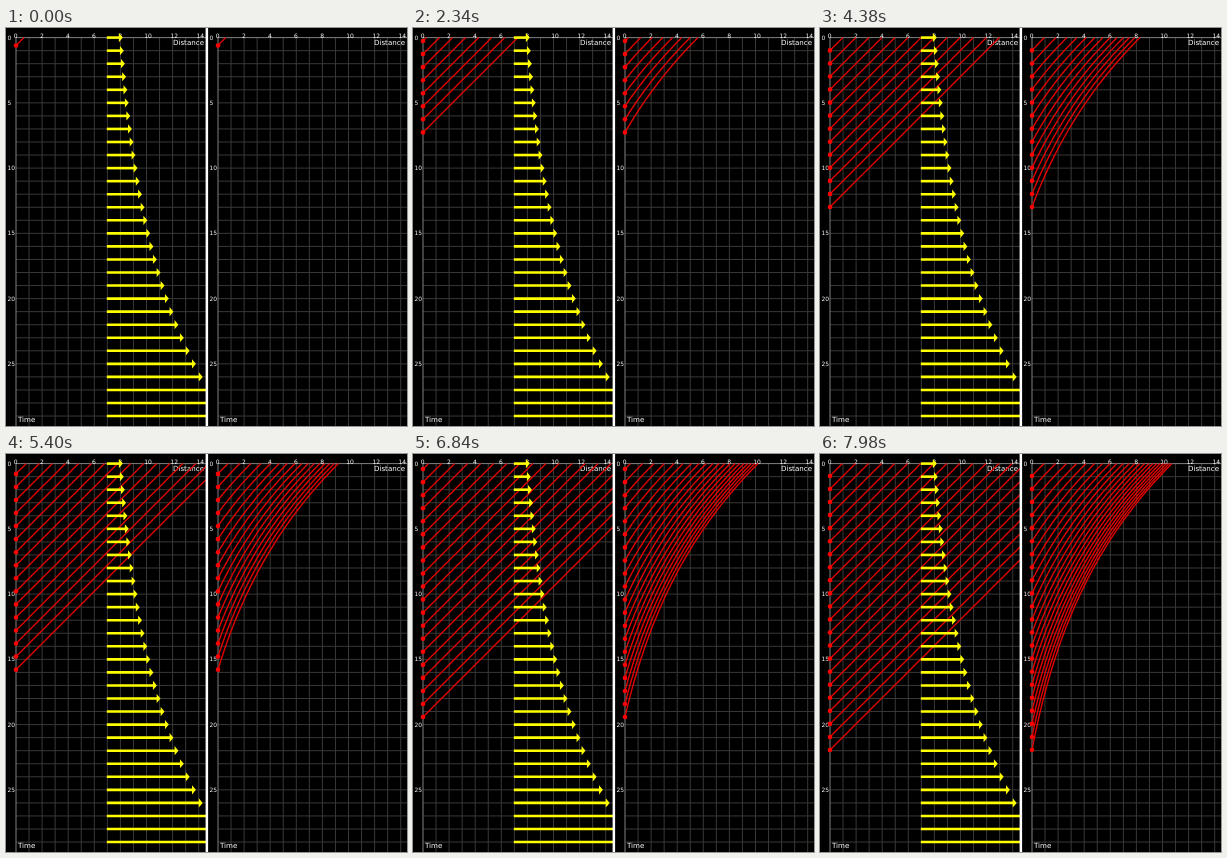
Write an HTML page with a canvas that moves like this. It is 401 px wide and 398 px high and loops after 8 s.

```html
<!DOCTYPE html>
<html lang="en">
<head>
<meta charset="utf-8">
<title>Light paths in static and expanding space</title>
<style>
html, body { margin: 0; width: 100%; height: 100%; overflow: hidden; background: #000; }
canvas { display: block; }
</style>
</head>
<body>
<canvas id="stage" width="401" height="398"></canvas>
<script>
const ctx = document.getElementById('stage').getContext('2d');
const W = 401, H = 398;
const UNIT = 13.05, TOP = 9.6, EXPANSION = 0.0755;
const LOOP = 8000, STEP = 60;
const LEFT = { x: 10, from: 0, to: 200 };
const RIGHT = { x: 212, from: 202, to: W };

// Vertical position of the earliest dot at a few steps.
const descent = [[0, 17.5], [24, 71.6], [53, 135], [84, 203.2], [98, 232.2], [112, 259.5], [126, 284.2], [133, 296]];

const rowY = t => TOP + t * UNIT;
const scaleAt = t => Math.exp(EXPANSION * t);
const straightPath = (t, end) => end - t;
const curvedPath = (t, end) => (1 / scaleAt(t) - 1 / scaleAt(end)) / EXPANSION;

function ageAt(step) {
  let i = 1;
  while (i < descent.length - 1 && step > descent[i][0]) i++;
  const [s0, y0] = descent[i - 1], [s1, y1] = descent[i];
  return (y0 + (y1 - y0) * (step - s0) / (s1 - s0) - TOP) / UNIT;
}

function line(x1, y1, x2, y2, color, width) {
  ctx.strokeStyle = color;
  ctx.lineWidth = width;
  ctx.beginPath();
  ctx.moveTo(x1, y1);
  ctx.lineTo(x2, y2);
  ctx.stroke();
}

function label(text, x, y, size, align = 'left') {
  ctx.font = `${size}px "DejaVu Sans", sans-serif`;
  ctx.textAlign = align;
  ctx.fillText(text, x, y);
}

function drawGrid({ x, from, to }) {
  for (let i = 1; x + i * UNIT < to; i++) line(x + i * UNIT, TOP, x + i * UNIT, H, '#3a3836', 1);
  for (let i = 1; rowY(i) < H; i++) line(x, rowY(i), to, rowY(i), '#3a3836', 1);
  line(x, TOP, to, TOP, '#808080', 1);
  line(x, TOP, x, H, '#808080', 1);

  ctx.fillStyle = '#fff';
  for (let i = 0; i <= 14; i += 2) label(i, x + i * UNIT - 2.2, 10.2, 6);
  for (let i = 0; i <= 25; i += 5) label(i, from + 1.5, rowY(i) + 2.1, 5.9);
  label('Distance', to - 2, 17.4, 7.1, 'right');
  label('Time', x + 2, 394, 7.1);
}

function drawPaths({ x }, path, age) {
  ctx.strokeStyle = '#e00000';
  ctx.fillStyle = '#f00';
  ctx.lineWidth = 1.4;
  for (let end = age; end >= 0; end--) {
    ctx.beginPath();
    for (let i = 0; i <= 40; i++) {
      const t = end * (1 - i / 40);
      ctx.lineTo(x + path(t, end) * UNIT, rowY(t));
    }
    ctx.stroke();
    ctx.beginPath();
    ctx.arc(x, rowY(end), 2.3, 0, 2 * Math.PI);
    ctx.fill();
  }
}

function drawArrows() {
  const start = LEFT.x + 7 * UNIT;
  ctx.fillStyle = '#ff0';
  for (let t = 0; t < 30; t++) {
    const y = rowY(t), end = start + scaleAt(t) * UNIT;
    line(start - 0.5, y, end, y, '#ff0', 2.6);
    ctx.beginPath();
    ctx.moveTo(end - 1.5, y - 4.6);
    ctx.lineTo(end + 2.4, y);
    ctx.lineTo(end - 1.5, y + 4.6);
    ctx.fill();
  }
}

function inPanel(panel, draw) {
  ctx.save();
  ctx.beginPath();
  ctx.rect(panel.from, 0, panel.to - panel.from, H);
  ctx.clip();
  draw();
  ctx.restore();
}

function render(time) {
  const age = ageAt(Math.floor(time / STEP));
  ctx.fillStyle = '#000';
  ctx.fillRect(0, 0, W, H);
  inPanel(LEFT, () => {
    drawGrid(LEFT);
    drawPaths(LEFT, straightPath, age);
    drawArrows();
  });
  inPanel(RIGHT, () => {
    drawGrid(RIGHT);
    drawPaths(RIGHT, curvedPath, age);
  });
  ctx.fillStyle = '#fff';
  ctx.fillRect(199.6, 0, 2.5, H);
}

const begin = performance.now();
function tick() {
  render((performance.now() - begin) % LOOP);
  requestAnimationFrame(tick);
}
tick();
</script>
</body>
</html>
```
